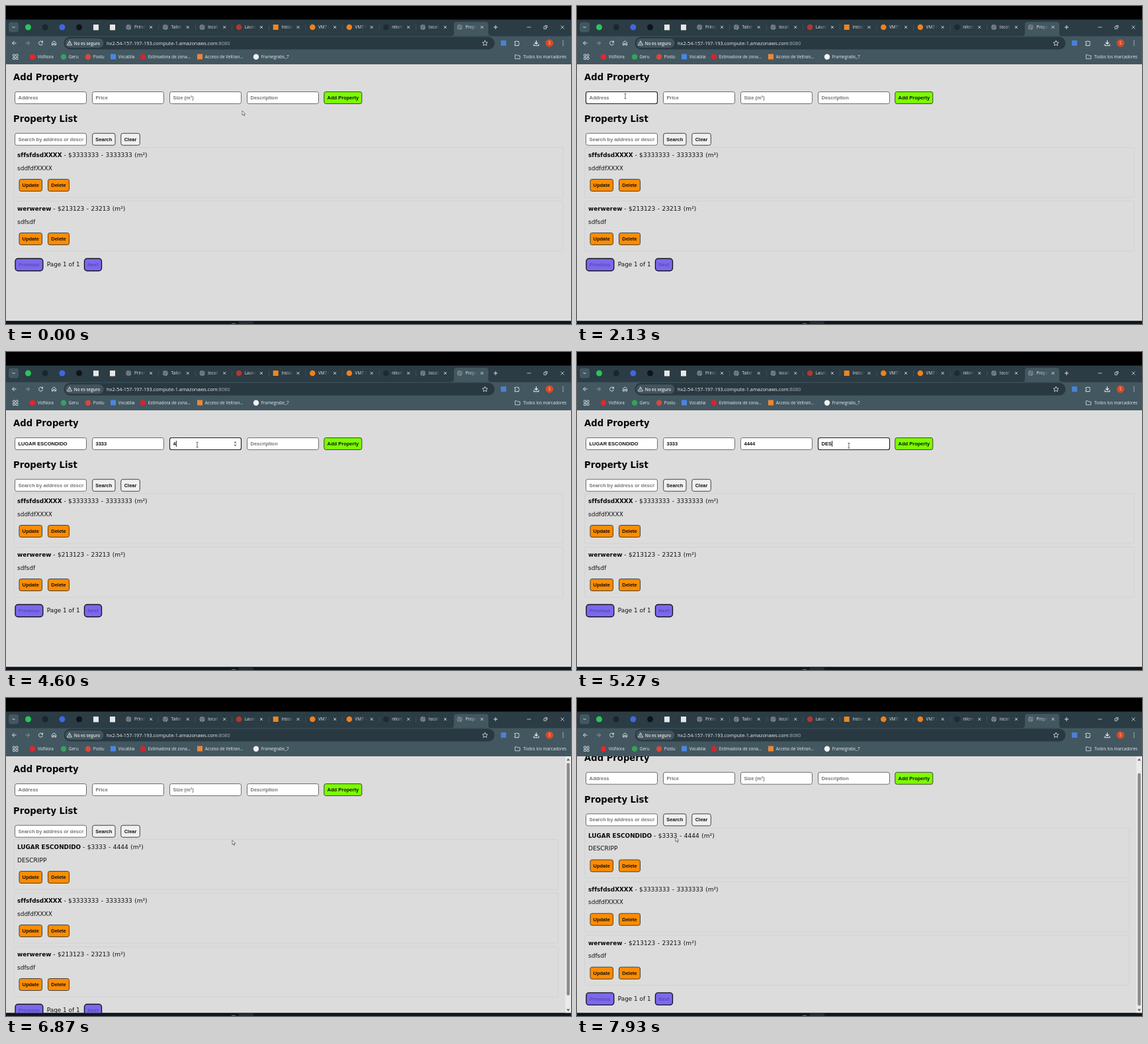
These frames come from a looping animation (854x480 px, 8 s). An HTML page with a canvas:

```html
<!DOCTYPE html>
<html lang="es">
<head>
<meta charset="utf-8">
<style>
  html, body { margin: 0; width: 100%; height: 100%; overflow: hidden; background: #000; }
  canvas { display: block; }
</style>
</head>
<body>
<canvas id="stage" width="854" height="480"></canvas>
<script>
const ctx = document.getElementById('stage').getContext('2d');
const LOOP = 8000;
const UI = '"Open Sans", sans-serif';
const PAGE = '"DejaVu Sans", sans-serif';
const FORM = '"Liberation Sans", sans-serif';
const STRIP = '#2b3c44', BAR = '#435761', OMNIBOX = '#293942', CHIP = '#42545d';

const URL_FOCUS = [930, 1670];
const SAVED = 6600;

// keys: [time, x, y]
const MOUSE = [
  [70, 357, 158], [700, 330, 78], [870, 300, 57], [970, 300, 57], [1470, 111, 118],
  [1730, 73, 136], [3400, 73, 136], [3670, 188, 140], [4070, 190, 141], [4270, 289, 140],
  [4820, 289, 140], [5000, 410, 140], [5600, 412, 143], [5850, 455, 165], [6110, 507.5, 139.5],
  [6470, 507.5, 139.5], [6900, 330, 220], [7270, 165, 246], [7600, 130, 239], [7930, 149, 210]
];

// keys: [time, typed characters]
const FIELDS = [
  { x: 13.5, hint: 'Address', text: 'LUGAR ESCONDIDO', focus: [1630, 3670],
    keys: [[2200, 0], [2535, 5], [2800, 5], [3200, 15]] },
  { x: 130.5, hint: 'Price', text: '3333', focus: [3670, 4330], spin: true,
    keys: [[3730, 0], [4000, 4]] },
  { x: 247.5, hint: 'Size (m²)', text: '4444', focus: [4330, 5000], spin: true,
    keys: [[4520, 0], [4800, 4]] },
  { x: 364.5, hint: 'Description', text: 'DESCRIPP', focus: [5000, 6470],
    keys: [[5070, 0], [5600, 8]] }
];

const OLD_ITEMS = [
  ['sffsfdsdXXXX', '$3333333 - 3333333', 'sddfdfXXXX'],
  ['werwerew', '$213123 - 23213', 'sdfsdf']
];
const NEW_ITEMS = [['LUGAR ESCONDIDO', '$3333 - 4444', 'DESCRIPP'], ...OLD_ITEMS];

const TABS = [
  ['globe', 'Princi'], ['globe', 'Taller'], ['globe', 'locall'], ['#b5362c', 'Launc'],
  ['square', 'Instan'], ['#f0801c', 'VM7 Ic'], ['#f0801c', 'VM7 Ic'], ['#1e2a34', 'nilom'],
  ['globe', 'locall'], ['globe', 'Prope']
];

const BOOKMARKS = [
  [40, '#e8252b', 'VidNora'], [87, '#35a35a', 'Geru'], [124, '#d9483b', 'Postu'],
  [162, '#4a86e0', 'Vocablia'], [207, '#d8242c', 'Estimadora de zona...'],
  [293, '#e9873a', 'Acceso de Veltran...'], [378, '#f2f2f2', 'Framegrabs_7']
];

const within = (t, [a, b]) => t >= a && t < b;

// Linear interpolation over keys of the form [time, ...values].
function sample(keys, t) {
  const i = keys.findIndex(k => k[0] > t);
  if (i === 0) return keys[0].slice(1);
  if (i < 0) return keys[keys.length - 1].slice(1);
  const a = keys[i - 1], b = keys[i], p = (t - a[0]) / (b[0] - a[0]);
  return a.slice(1).map((v, j) => v + (b[j + 1] - v) * p);
}

function text(str, x, y, font, color) {
  ctx.font = font;
  ctx.fillStyle = color;
  ctx.fillText(str, x, y);
  return x + ctx.measureText(str).width;
}

function rect(x, y, w, h, color) {
  ctx.fillStyle = color;
  ctx.fillRect(x, y, w, h);
}

function box(x, y, w, h, r, fill, stroke, line = 1) {
  ctx.beginPath();
  ctx.roundRect(x, y, w, h, r);
  if (fill) { ctx.fillStyle = fill; ctx.fill(); }
  if (stroke) { ctx.strokeStyle = stroke; ctx.lineWidth = line; ctx.stroke(); }
}

function dot(x, y, r, color) {
  ctx.beginPath();
  ctx.arc(x, y, r, 0, 7);
  ctx.fillStyle = color;
  ctx.fill();
}

function path(d, x, y, color, line = 1, fill) {
  const p = new Path2D(d);
  ctx.save();
  ctx.translate(x, y);
  if (fill) { ctx.fillStyle = fill; ctx.fill(p); }
  if (color) { ctx.strokeStyle = color; ctx.lineWidth = line; ctx.stroke(p); }
  ctx.restore();
}

function globe(x, y) {
  dot(x, y, 4, '#7b8589');
  path('M-3.5 -1 L0 0.5 L-1 3.5 M0.5 -3.5 L1 -1 L3.5 0', x, y, '#4a565c', 1);
}

function drawTabs() {
  rect(0, 20.5, 854, 25.5, STRIP);
  box(4, 24.5, 15, 15, 4, BAR);
  path('M-2 -1 L0 1 L2 -1', 11.5, 32, '#e3e3e3');
  ['#27c65a', '#1b262d', '#3f66e6', '#101416'].forEach((c, i) => dot(33.5 + i * 25.7, 32, 4.5, c));
  rect(132, 28, 8, 8.5, '#e6e6e6');
  rect(157, 28, 8, 8.5, '#e6e6e6');

  path('M673 45.5 Q677 45 677 41 V28 Q677 24 681 24 H725 Q729 24 729 28 V41 Q729 45 733 45.5 Z',
    0, 0, null, 0, BAR);
  TABS.forEach(([icon, title], i) => {
    const x = 185.3 + i * 55.6, active = i === TABS.length - 1;
    if (icon === 'globe') globe(x, 32);
    else if (icon === 'square') rect(x - 4, 28, 8, 8, '#ee861e');
    else dot(x, 32, 4.3, icon);
    const fade = ctx.createLinearGradient(x + 16, 0, x + 26, 0);
    fade.addColorStop(0, '#e4e8ea');
    fade.addColorStop(1, active ? BAR : STRIP);
    text(title, x + 8.7, 34.3, '6.4px ' + UI, fade);
    path('M-2 -2 L2 2 M2 -2 L-2 2', x + 33.8, 32, '#dde2e4', 0.9);
    if (i < 8) rect(x + 45, 28, 0.6, 9, '#4a5c65');
  });
  path('M-3 0 H3 M0 -3 V3', 740, 32, '#dedede');
  path('M-3 0 H3', 790.5, 32, '#dedede', 0.8);
  path('M-2 -1 H1.5 V2.5 H-2 Z M-0.5 -2.5 H3 V1', 815, 32, '#dedede', 0.8);
  path('M-2.5 -2.5 L2.5 2.5 M2.5 -2.5 L-2.5 2.5', 841, 32, '#dedede', 0.8);
}

function drawToolbar(t) {
  const focused = within(t, URL_FOCUS), ink = '#dde3e6';
  rect(0, 45.5, 854, 42.5, BAR);
  path('M3 0 H-3 M0 -3 L-3 0 L0 3', 12.5, 56, ink);
  path('M-3 0 H3 M0 -3 L3 0 L0 3', 32.5, 56, '#8d999f');
  path('M2.6 -1.6 A3 3 0 1 0 3 0.8 M3 -3.5 V-1 H0.5', 52.5, 56, ink);
  path('M-3 3 V-0.6 L0 -3.2 L3 -0.6 V3 H1 V0.5 H-1 V3 Z', 72.5, 56, ink);

  box(87.5, 46.5, 651, 19, 9.5, OMNIBOX, focused && '#a8d4ee', 1.4);
  box(89.5, 49, 58, 14, 7, CHIP);
  path('M0 -3.3 L3.6 3 H-3.6 Z M0 -1 V1 M0 1.7 V2.4', 96, 56, '#e6e6e6', 0.9);
  text('No es seguro', 102.7, 58.6, '600 6.3px ' + UI, '#e8e8e8');
  if (focused) rect(151.5, 51, 188, 11, '#156c90');
  const end = text('hx2-54-157-197-193.compute-1.amazonaws.com', 152, 58.8, '7.4px ' + UI, '#ededed');
  text(':8080', end, 58.8, '7.4px ' + UI, focused ? '#ededed' : '#a9b3b8');
  if (focused) {
    box(651, 49.5, 60.5, 13.5, 6.7, CHIP);
    dot(659, 56.2, 3, '#d6d6d6');
    text('Vorela Scan', 666.5, 58.7, '600 6.7px ' + UI, '#eeeeee');
  }
  path('M0 -4 L1.2 -1.2 L4 -1 L1.9 0.9 L2.5 3.7 L0 2.2 L-2.5 3.7 L-1.9 0.9 L-4 -1 L-1.2 -1.2 Z',
    724, 56, ink, 0.8);
  rect(748, 52, 8, 8, '#4a80d8');
  path('M-3 -2.5 H-1 A1.2 1.2 0 0 1 1.2 -2.5 H3 V-0.5 A1.2 1.2 0 0 1 3 1.6 V3.7 H-3 V1.8 A1.2 1.2 0 0 0 -3 -0.6 Z',
    772, 56, ink);
  path('M0 -4 V1.3 M-2.4 -1 L0 1.4 L2.4 -1 M-3.6 1.5 V3.7 H3.6 V1.5', 801.5, 56, '#ececec', 1.1);
  dot(821.5, 56, 5.8, '#d94a25');
  text('S', 819.8, 58.4, '6.3px ' + UI, '#f5d8cf');
  [-3, 0, 3].forEach(d => dot(842, 56 + d, 0.8, ink));

  [[10.5, 73], [15, 73], [10.5, 77.5], [15, 77.5]].forEach(([x, y]) => box(x, y, 3, 3, 0.4, null, ink, 0.9));
  BOOKMARKS.forEach(([x, color, label], i) => {
    if (i === 3 || i === 5) rect(x - 4, 72.5, 8, 8, color);
    else dot(x, 76.7, 4.2, color);
    text(label, x + 7.8, 79, '6.4px ' + UI, '#e8ecee');
  });
  path('M-3.5 -2.7 H-0.8 L0.3 -1.6 H3.8 V3.2 H-3.5 Z', 773, 76.5, ink, 0.8);
  text('Todos los marcadores', 782, 79, '6.4px ' + UI, '#e8ecee');
}

function label(str, x, y, color) {
  return text(str, x, y + 11.4, 'bold 7.5px ' + FORM, color);
}

function button(str, x, y, w, fill) {
  box(x, y, w, 18, 2.8, fill, '#404040');
  ctx.textAlign = 'center';
  label(str, x + w / 2, y, '#101010');
  ctx.textAlign = 'left';
}

function pager(str, x, y, w) {
  box(x, y, w, 18.5, 4, '#7b68ee', '#15131f', 1.4);
  ctx.textAlign = 'center';
  label(str, x + w / 2, y + 0.4, '#5a4db0');
  ctx.textAlign = 'left';
}

function input(x, y, str, color, focused) {
  box(x, y, 108, 18, 2.8, '#ffffff', focused ? '#1c1c1c' : '#6c6c6c', focused ? 1.15 : 1);
  ctx.save();
  ctx.beginPath();
  ctx.rect(x, y, 104, 18);
  ctx.clip();
  const end = label(str, x + 5, y, color);
  ctx.restore();
  return end;
}

function caretOn(f, t) {
  const start = f.keys[0][0], stop = f.keys[f.keys.length - 1][0];
  const since = t < start ? t - f.focus[0] : Math.max(0, t - stop);
  return since % 1000 < 500;
}

function drawField(f, t, mouse) {
  const count = t < SAVED ? Math.floor(sample(f.keys, t)[0]) : 0;
  const focused = within(t, f.focus);
  const typed = f.text.slice(0, count);
  const end = input(f.x, 129.5, typed || f.hint, typed ? '#101010' : '#757575', focused);
  if (focused && caretOn(f, t)) rect(typed ? end + 0.3 : f.x + 5, 134, 0.9, 9, '#101010');
  const hover = mouse[1] > 129 && mouse[1] < 148 && mouse[0] > f.x && mouse[0] < f.x + 108;
  if (f.spin && (focused || hover)) {
    path('M-2.3 -1.2 L0 -3.8 L2.3 -1.2 Z M-2.3 1.2 L0 3.8 L2.3 1.2 Z', f.x + 99, 138.6, null, 0, '#7b7b7b');
  }
}

function drawItem([name, numbers, note], y, right) {
  box(11.5, y, right - 11.5, 75.5, 2.5, null, '#d2d2d3');
  const end = text(name, 17, y + 14.5, 'bold 8.9px ' + PAGE, '#080808');
  ctx.wordSpacing = '0.6px';
  text(` - ${numbers} (m²)`, end, y + 14.5, '9.05px ' + PAGE, '#101010');
  ctx.wordSpacing = '0px';
  text(note, 17, y + 34.2, '9px ' + PAGE, '#101010');
  button('Update', 20, y + 48, 34.5, '#ff8c00');
  button('Delete', 63.5, y + 48, 32, '#ff8c00');
}

function drawScrollbar(scroll) {
  rect(845.5, 88, 8.5, 388, '#ebebeb');
  path('M-2.5 1.5 L0 -2 L2.5 1.5 Z', 849.8, 93, null, 0, '#606060');
  path('M-2.5 -1.5 L0 2 L2.5 -1.5 Z', 849.8, 471, null, 0, '#606060');
  box(847.5, 98 + scroll * 0.9, 4.6, 351, 2.3, '#8b8b8b');
}

function drawPage(t, mouse) {
  const saved = t >= SAVED;
  const p = Math.min(1, Math.max(0, (t - 7650) / 240));
  const scroll = 17.3 * (1 - (1 - p) ** 2);
  const items = saved ? NEW_ITEMS : OLD_ITEMS;
  ctx.save();
  ctx.beginPath();
  ctx.rect(0, 88, 854, 387.5);
  ctx.clip();
  rect(0, 88, 854, 388, '#dcdcdc');
  ctx.save();
  ctx.translate(0, -scroll);
  text('Add Property', 11, 112, 'bold 13.2px ' + PAGE, '#050505');
  FIELDS.forEach(f => drawField(f, t, mouse));
  button('Add Property', 480.8, 129.5, 57, '#7cfc00');
  text('Property List', 11, 174.8, 'bold 13.2px ' + PAGE, '#050505');
  input(13.5, 192.2, 'Search by address or description', '#757575', false);
  button('Search', 130.7, 192.2, 34.3, '#f0f0f0');
  button('Clear', 173.8, 192.2, 28.5, '#f0f0f0');
  items.forEach((item, i) => drawItem(item, 213.5 + i * 81, saved ? 834.5 : 842.5));
  const y = 219.2 + items.length * 81;
  pager('Previous', 14, y, 41.8);
  text('Page 1 of 1', 61.8, y + 11.8, '8.9px ' + PAGE, '#101010');
  pager('Next', 118.5, y, 26);
  ctx.restore();
  if (saved) drawScrollbar(scroll);
  ctx.restore();
}

function drawMouse([x, y]) {
  const onField = y > 129 && y < 148 && FIELDS.some(f => x > f.x && x < f.x + 108);
  const onUrl = y > 47 && y < 66 && x > 150 && x < 645;
  if (onField || onUrl) {
    path('M-1.5 -3.7 H1.5 M0 -3.7 V3.7 M-1.5 3.7 H1.5', x, y, onUrl ? '#e0e0e0' : '#444', 0.8);
  } else {
    path('M0 0 V6.6 L1.6 5.3 L2.7 7.8 L3.8 7.3 L2.8 4.9 H4.8 Z', x, y, '#555', 0.8, '#fff');
  }
}

function draw(t) {
  const mouse = sample(MOUSE, t);
  rect(0, 0, 854, 480, '#000');
  drawTabs();
  drawToolbar(t);
  drawPage(t, mouse);
  rect(0, 475.5, 854, 4.5, '#0d1521');
  rect(352, 476, 22, 4, '#202a38');
  rect(341, 478.8, 6, 1.2, '#59636d');
  drawMouse(mouse);
}

function tick() {
  draw(performance.now() % LOOP);
  requestAnimationFrame(tick);
}
tick();
</script>
</body>
</html>
```
